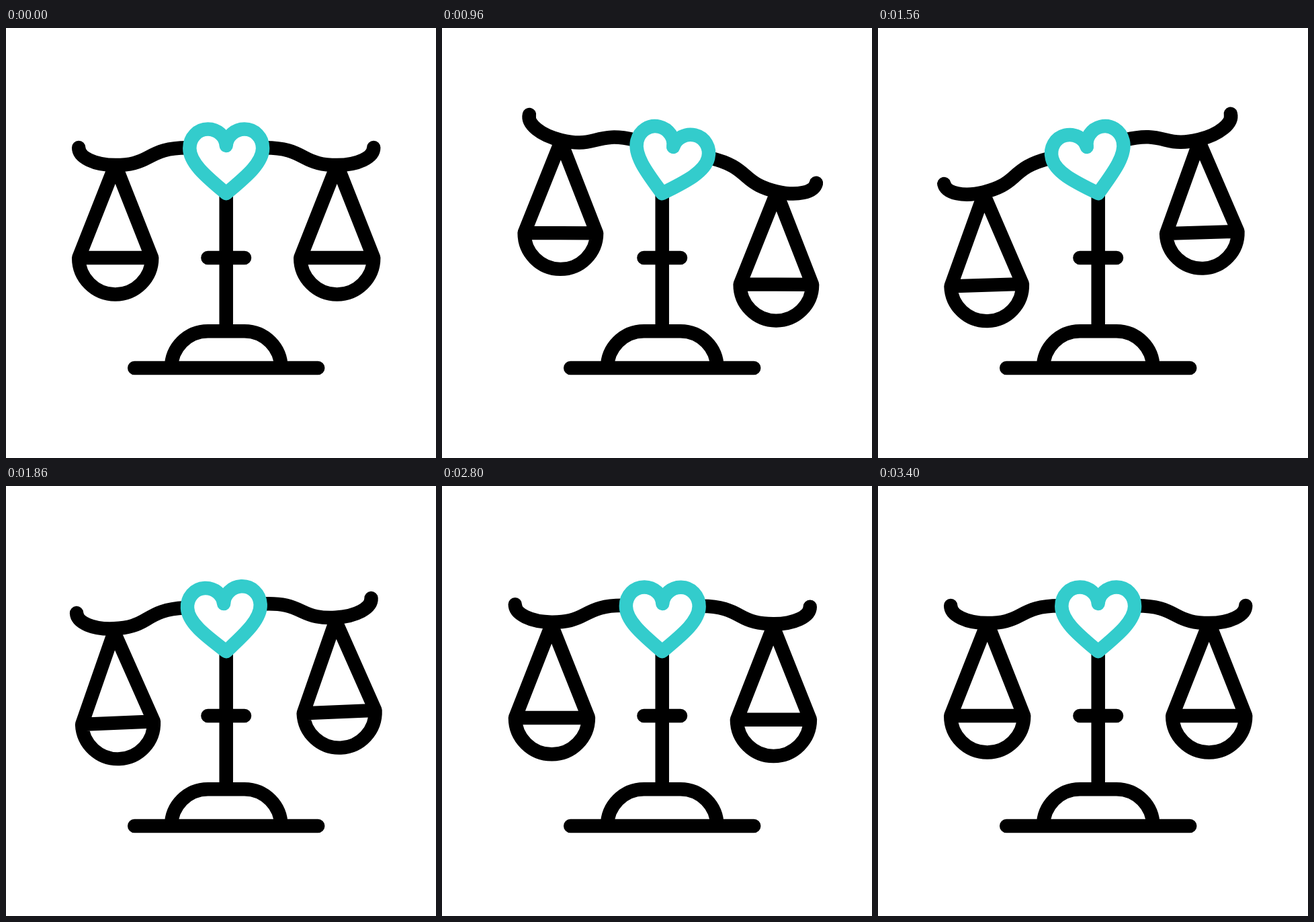
Recreate the animation shown at these times as an HTML page with a canvas. Size 640 by 640 pixels, loop 3.62 s.

```html
<!DOCTYPE html>
<html lang="en">
<head>
<meta charset="utf-8">
<title>Balance</title>
<style>
html, body { margin: 0; width: 100%; height: 100%; overflow: hidden; background: #fff; }
canvas { display: block; width: 640px; height: 640px; }
</style>
</head>
<body>
<canvas id="stage" width="640" height="640"></canvas>
<script>
const ctx = document.getElementById('stage').getContext('2d');
const LOOP = 3620, STEP = 20;
const CX = 327.7, PIVOT = 246;          // beam turns about the heart's tip
const HOOK_X = 165, HOOK_Y = -42;       // where a pan hangs, from the pivot
const BOWL = 158;                       // hook to bowl centre
const RAD = Math.PI / 180;

// Turning points of the beam; the swing halves after each full sway.
const turns = [200, 900, 1600, 2100, 2600, 2910, 3160, 3400];

// All shapes are centred on x = 0.
const beam = new Path2D(
  'M-219.5 178 C-219.5 192.5 -196 204 -165 204 C-142 204 -130 200 -116 192.5 C-101 184.5 -88 178.3 -58 178.3');
const heart = new Path2D(
  'M0 175 C-.8 161.5 -13 150.6 -27.2 150.6 C-42.5 150.6 -54.4 163 -54.4 179 C-54.4 202 -26 224 0 246.2 ' +
  'C26 224 54.4 202 54.4 179 C54.4 163 42.5 150.6 27.2 150.6 C13 150.6 .8 161.5 0 175 Z');
const stand = new Path2D(
  'M-136.5 506 H136.5 M-27.3 342 H27.3 M0 246 V451 ' +
  'M-81.7 506 A54.5 54.5 0 0 1 -27.2 451.3 H27.2 A54.5 54.5 0 0 1 81.7 506');
const pan = new Path2D('M0 -158 L-54.5 -20 A54.5 54.5 0 0 0 54.5 -20 Z M-54.5 -20 H54.5');

const clamp = x => Math.min(1, Math.max(0, x));
const ramp = (t, a, b) => { const x = clamp((t - a) / (b - a)); return x * x * (3 - 2 * x); };
const bump = (t, a, b) => Math.sin(Math.PI * clamp((t - a) / (b - a)));

function swing(i) {
  if (i === 0 || i === turns.length - 1) return 0;
  return (i % 2 ? 14 : -14) / 2 ** Math.floor((i - 1) / 2);
}

function beamAngle(t) {
  let angle = 0;
  for (let i = 1; i < turns.length; i++) {
    angle += (swing(i) - swing(i - 1)) * ramp(t, turns[i - 1], turns[i]);
  }
  return angle * RAD;
}

// The pans lag behind: a small push out, a longer one back.
function panAngle(t) {
  return (0.8 * ramp(t, 200, 600) - 3.2 * ramp(t, 600, 1950) + 2.4 * ramp(t, 1950, 2950)) * RAD;
}

function stroke(path, color, cap, join) {
  ctx.strokeStyle = color;
  ctx.lineCap = cap;
  ctx.lineJoin = join;
  ctx.stroke(path);
}

function drawPan(side, t, angle) {
  const c = Math.cos(angle), s = Math.sin(angle);
  const x = side * HOOK_X, sag = 4.8 * bump(t, 1600, 3400);
  const size = 1 - 0.02 * bump(t, 600, 2400);
  const tilt = panAngle(t);
  ctx.save();
  ctx.translate(CX + x * c - HOOK_Y * s, PIVOT + x * s + HOOK_Y * c + sag);
  ctx.rotate(tilt);
  ctx.translate(0, BOWL);
  ctx.scale(size, size);
  stroke(pan, '#000', 'butt', 'bevel');
  ctx.restore();
}

function draw(t) {
  const angle = beamAngle(t);
  ctx.fillStyle = '#fff';
  ctx.fillRect(0, 0, 640, 640);
  ctx.lineWidth = 20.5;

  ctx.save();
  ctx.translate(CX, 0);
  stroke(stand, '#000', 'round', 'round');
  ctx.restore();

  for (const side of [-1, 1]) drawPan(side, t, angle);

  ctx.save();
  ctx.translate(CX, PIVOT);
  ctx.rotate(angle);
  ctx.translate(0, -PIVOT);
  for (let i = 0; i < 2; i++) {
    stroke(beam, '#000', 'round', 'round');
    ctx.scale(-1, 1);
  }
  ctx.fillStyle = '#fff';
  ctx.fill(heart);
  stroke(heart, '#33cccc', 'round', 'round');
  ctx.restore();
}

const start = performance.now();
function frame() {
  const t = (performance.now() - start) % LOOP;
  draw(Math.floor(t / STEP) * STEP);
  requestAnimationFrame(frame);
}
frame();
</script>
</body>
</html>
```
